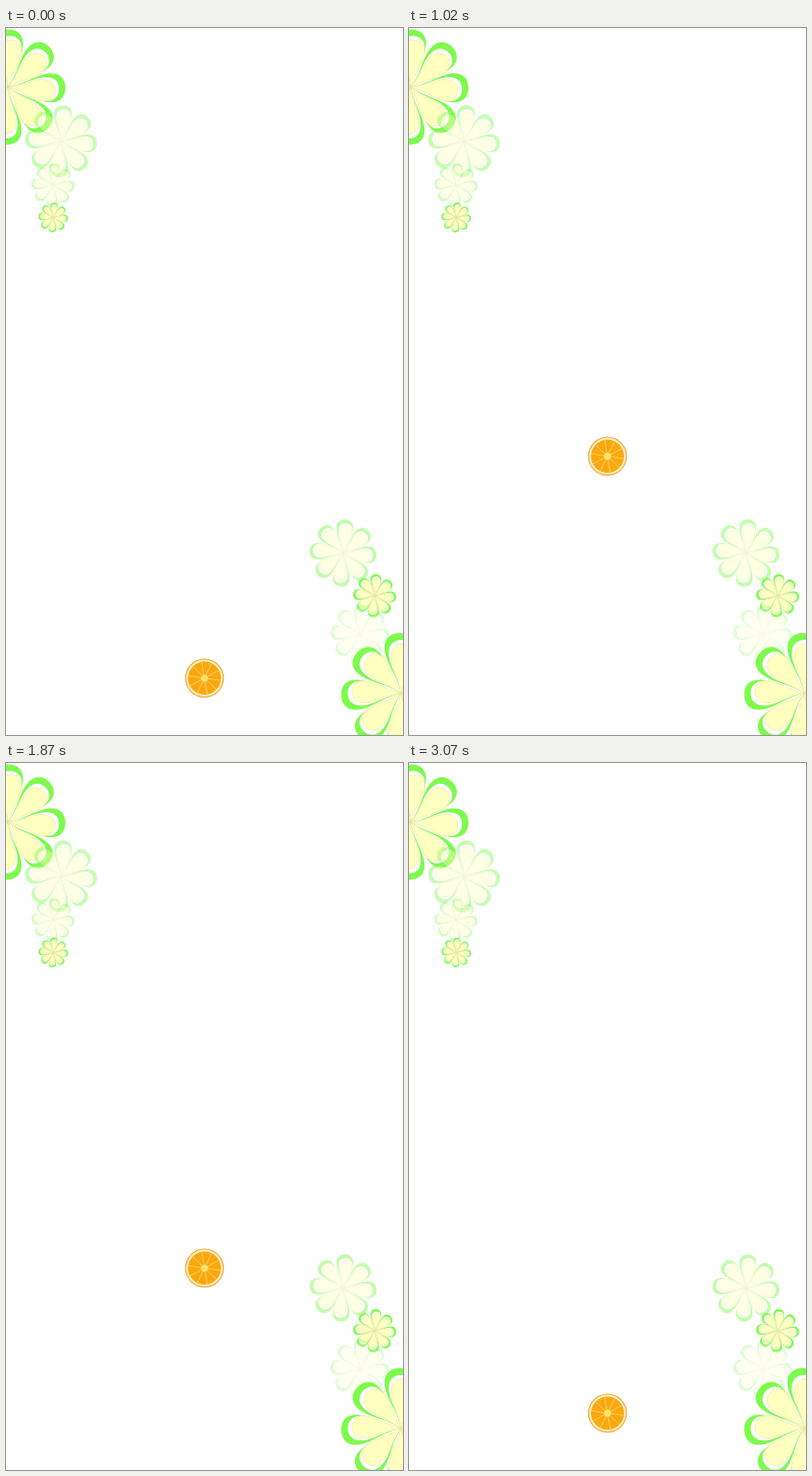
An HTML page for the animation above (3.47 s loop, 414 by 736 pixels).

```html
<!DOCTYPE html>
<html lang="en">
<head>
<meta charset="utf-8">
<title>Bouncing orange slice</title>
<style>
html, body { margin: 0; width: 100%; height: 100%; overflow: hidden; background: #fff; }
svg { display: block; width: 414px; height: 736px; }
</style>
</head>
<body>
<svg id="stage" viewBox="0 0 414 736"></svg>
<script>
const NS = 'http://www.w3.org/2000/svg';
const add = (parent, tag, attrs = {}) => {
  const node = document.createElementNS(NS, tag);
  for (const key in attrs) node.setAttribute(key, attrs[key]);
  return parent.appendChild(node);
};
const stage = document.getElementById('stage');

// Petal outline of length l and half width w, pointing along +x
function teardrop(l, w) {
  return `M0 0C${.35 * l} ${-.3 * w} ${.52 * l} ${-w} ${.76 * l} ${-w}` +
    `C${.92 * l} ${-w} ${l} ${-.55 * w} ${l} 0` +
    `C${l} ${.55 * w} ${.92 * l} ${w} ${.76 * l} ${w}` +
    `C${.52 * l} ${w} ${.35 * l} ${.3 * w} 0 0Z`;
}

function flower(x, y, r, opacity = 1, turn = 4) {
  const group = add(stage, 'g', { opacity, transform: `translate(${x} ${y}) rotate(${turn}) scale(${r})` });
  for (let angle = 0; angle < 360; angle += 45) {
    const petal = add(group, 'g', { transform: `rotate(${angle})` });
    add(petal, 'path', { d: teardrop(1, .25), fill: '#7dfa4c' });
    add(petal, 'path', { d: teardrop(.89, .205), fill: '#fff', transform: 'rotate(2)' });
    add(petal, 'path', {
      d: teardrop(.82, .185), fill: '#ffffc0', transform: 'rotate(4)',
      stroke: '#e6d98a', 'stroke-width': .4 / r
    });
  }
}

flower(2, 61.5, 60, 1, 1);
flower(57.5, 118, 37.5, .42);
flower(49, 163.5, 22.5, .36);
flower(49.3, 197.3, 15.5);
flower(351.5, 546.5, 35, .45);
flower(384.5, 591, 22.5, .95);
flower(369, 631, 31, .23);
flower(412, 692.5, 62.5, 1, -2);

const orange = add(stage, 'g');
const disc = (r, fill) => add(orange, 'circle', { r, fill });
disc(20.3, '#f3a42a');
disc(19.2, '#fff0c8');
disc(17.2, '#faa80f');
for (let i = 0; i < 10; i++) {
  add(orange, 'path', {
    d: 'M3 0H17.5', stroke: '#ffd26a', 'stroke-width': .8, transform: `rotate(${i * 36 + 8})`
  });
}
disc(3.6, '#ffe76e');

const LOOP = 3470, HOLD = 100, STEP = 50, FLOOR = 676.8;
// Step and height above the floor at each change of speed
const keys = [[0, 0], [10, 88], [25, 302], [33, 191], [34, 191], [44, 57], [53, 0], [57, 17], [61, 0]];

function heightAt(t) {
  const step = t < HOLD ? 0 : Math.floor((t - 20) / STEP);
  const next = keys.findIndex(key => key[0] > step);
  if (next < 0) return 0;
  const [s0, h0] = keys[next - 1], [s1, h1] = keys[next];
  return h0 + (h1 - h0) * (step - s0) / (s1 - s0);
}

const start = performance.now();
function draw() {
  const y = FLOOR - Math.round(heightAt((performance.now() - start) % LOOP));
  orange.setAttribute('transform', `translate(207 ${y})`);
  requestAnimationFrame(draw);
}
draw();
</script>
</body>
</html>
```
